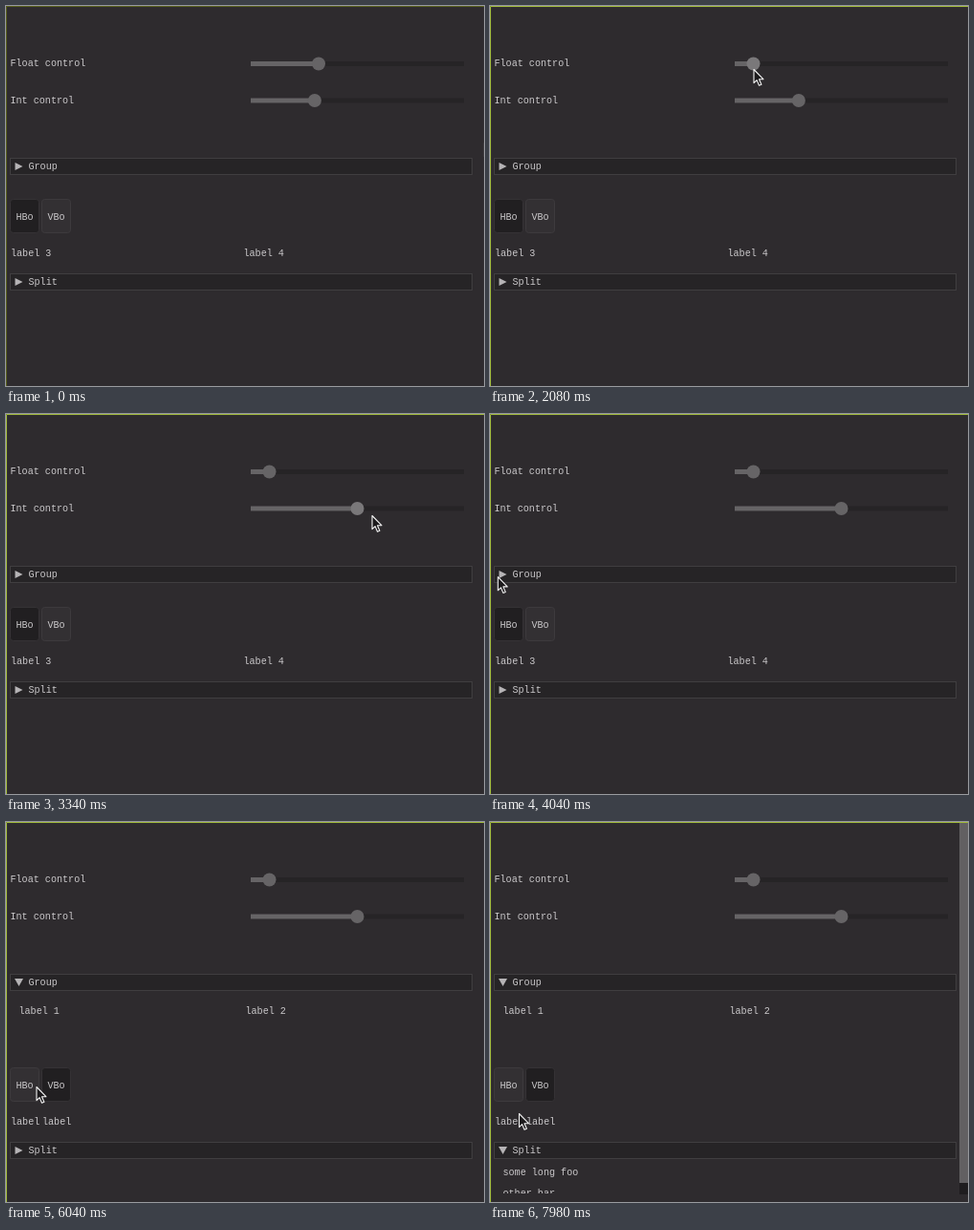
Recreate the animation shown at these times as an HTML page. Size 500x398 px, loop 8000 ms.

```html
<!DOCTYPE html>
<html lang="en">
<head>
<meta charset="utf-8">
<title>Controls demo</title>
<style>
  html, body { margin: 0; width: 100%; height: 100%; overflow: hidden; background: #2e2b2e; }
  svg { display: block; width: 500px; height: 398px; }
  text { font: 10.1px "Liberation Mono", "DejaVu Sans Mono", monospace; fill: #cac8ca; white-space: pre; }
  .track, .head { fill: #262426; }
  .head { stroke: #403e40; }
  .fill, .knob { fill: #666466; }
  .knob.lit { fill: #7a787a; }
  .arrow { fill: #b6b4b6; }
  .btn { fill: #333033; stroke: #3d3a3d; }
  .btn.on { fill: #211f21; stroke: #353235; }
</style>
</head>
<body>
<svg id="stage" viewBox="0 0 500 398"></svg>
<script>
const LOOP = 8000;
const stage = document.getElementById('stage');

// Pointer moves: start, end, x, y. It rests between them.
const entry = [500, 143];
const moves = [
  [120, 300, 347, 127],
  [440, 1130, 322.5, 60],
  [1420, 1900, 275.5, 66],
  [2080, 2220, 295, 86],
  [2240, 2960, 355, 102],
  [3060, 3320, 382.5, 106],
  [3380, 3660, 14, 172],
  [3900, 4080, 7, 170],
  [4740, 4880, 23.5, 196],
  [4880, 5480, 47, 279],
  [5900, 6040, 31.5, 277],
  [6560, 6740, 45, 279],
  [6860, 7300, 12, 343],
  [7420, 7580, 10, 345],
  [7840, 7975, 30, 305]
];
const press = { float: 1420, int: 2700, group: 4220, split: 7400 };
const boxToggles = [5580, 6160, 6760];

const ease = f => f * f * (3 - 2 * f);

function pointerAt(t) {
  let [x, y] = entry;
  for (const [start, end, toX, toY] of moves) {
    if (t < start) break;
    const f = ease(Math.min(1, (t - start) / (end - start)));
    x += (toX - x) * f;
    y += (toY - y) * f;
  }
  return [x, y];
}

function add(tag, attrs, parent = stage, text) {
  const el = document.createElementNS('http://www.w3.org/2000/svg', tag);
  for (const k in attrs) el.setAttribute(k, attrs[k]);
  if (text) el.textContent = text;
  return parent.appendChild(el);
}
const set = (el, k, v) => el.setAttribute(k, v);
const show = (el, on) => set(el, 'visibility', on ? 'visible' : 'hidden');
const label = (x, y, s, parent) => add('text', { x, y }, parent, s);

const MIN_X = 256, RANGE = 223, NOTCH = RANGE / 10;

function slider(y) {
  add('rect', { class: 'track', x: MIN_X, y: y - 2.5, width: RANGE, height: 5 });
  const fill = add('rect', { class: 'fill', x: MIN_X, y: y - 2.5, height: 5 });
  const knob = add('circle', { class: 'knob', cy: y, r: 7 });
  return (x, mx, my) => {
    set(fill, 'width', x - MIN_X);
    set(knob, 'cx', x);
    const lit = mx > 250 && mx < 485 && Math.abs(my - y) < 8.5;
    set(knob, 'class', lit ? 'knob lit' : 'knob');
  };
}

function header(y, name, parent) {
  add('rect', { class: 'head', x: 4.5, y: y + .5, width: 483, height: 17 }, parent);
  const arrow = add('path', { class: 'arrow' }, parent);
  label(23.5, y + 12, name, parent);
  return open => set(arrow, 'd', open
    ? `M9 ${y + 5}h9l-4.5 8z`
    : `M9.5 ${y + 5}l8 4l-8 4z`);
}

function button(x, name, parent) {
  const box = add('rect', { class: 'btn', x: x + .5, y: 202.5, width: 30, height: 35, rx: 3 }, parent);
  label(x + 6.5, 223.5, name, parent);
  return on => set(box, 'class', on ? 'btn on' : 'btn');
}

const edge = add('path', { d: 'M.5 398V.5H500', fill: 'none' });
label(4.5, 63, 'Float control');
label(4.5, 102, 'Int control');
const floatSlider = slider(60.5);
const intSlider = slider(99);

const group = header(159, 'Group');
const rows = add('g', {});
label(13.5, 201, 'label 1', rows);
label(250.5, 201, 'label 2', rows);

const lower = add('g', {});
const hBox = button(4, 'HBo', lower);
const vBox = button(37, 'VBo', lower);
const left = label(5, 261.5, 'label 3', lower);
const right = label(248.5, 261.5, 'label 4', lower);
const split = header(280, 'Split', lower);

const clip = add('clipPath', { id: 'view' });
add('rect', { width: 491, height: 389 }, clip);
const items = add('g', { 'clip-path': 'url(#view)' });
label(13.5, 369.5, 'some long foo', items);
label(13.5, 391.5, 'other bar', items);

const bar = add('g', {});
add('rect', { x: 491, y: 1, width: 9, height: 389, fill: '#1f1d1f' }, bar);
add('rect', { x: 491, y: 1, width: 9, height: 377, fill: '#626062' }, bar);

const pointer = add('path', {
  d: 'M.5 .5V14.6L3.6 11.6L6 17.2L8.4 16.2L6 10.7H10.4Z',
  fill: '#1c1a1c', stroke: '#f2f2f2', 'stroke-width': 1.1, 'stroke-linejoin': 'round'
});

function floatX(t) {
  return t < press.float ? 327 : pointerAt(Math.min(t, 2000))[0];
}

function intX(t) {
  const x = pointerAt(Math.min(t, 3350))[0];
  const value = t < press.int ? 3 : Math.floor((x - MIN_X) / NOTCH);
  return MIN_X + value * NOTCH;
}

function render(t) {
  const [mx, my] = pointerAt(t);
  const open = t >= press.group;
  const splitOpen = t >= press.split;
  const vertical = boxToggles.filter(s => s <= t).length % 2 === 1;

  set(edge, 'stroke', t < 1240 ? '#545c1a' : '#9fb83a');
  floatSlider(floatX(t), mx, my);
  intSlider(intX(t), mx, my);

  group(open);
  show(rows, open);
  set(lower, 'transform', `translate(0 ${open ? 55 : 0})`);
  hBox(!vertical);
  vBox(vertical);
  left.textContent = vertical ? 'label' : 'label 3';
  right.textContent = vertical ? 'label' : 'label 4';
  set(right, 'x', vertical ? 38 : 248.5);

  split(splitOpen);
  show(items, splitOpen);
  show(bar, splitOpen);
  set(pointer, 'transform', `translate(${mx.toFixed(1)} ${my.toFixed(1)})`);
}

const start = performance.now();
function tick() {
  render((performance.now() - start) % LOOP);
  requestAnimationFrame(tick);
}
tick();
</script>
</body>
</html>
```
